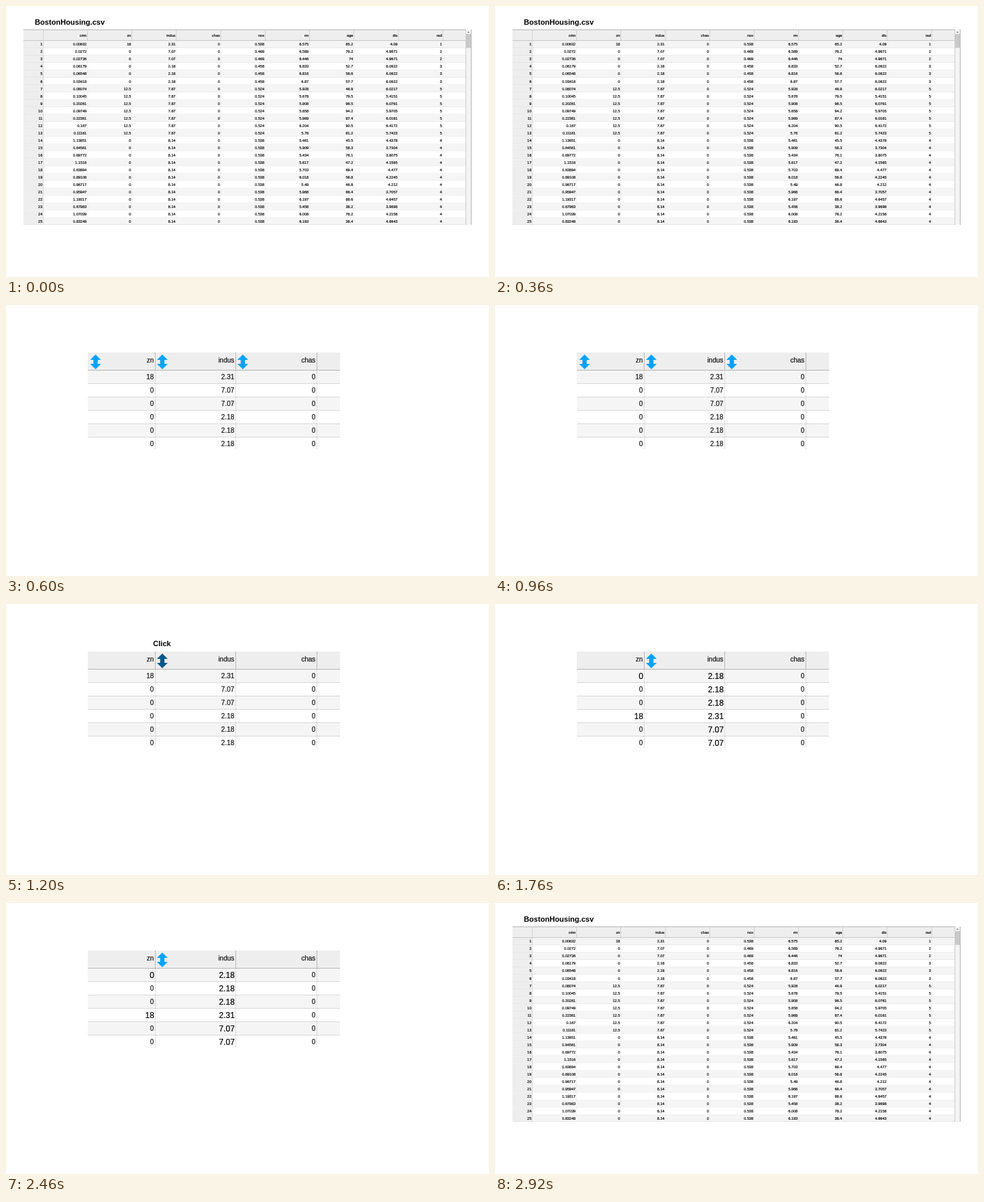
Animation, 720 px wide and 405 px high, one loop 2.96 s. Source, as an HTML page with a canvas:

```html
<!DOCTYPE html>
<html lang="en">
<head>
<meta charset="utf-8">
<title>Sorting a table</title>
<style>
  html, body { margin: 0; width: 100%; height: 100%; overflow: hidden; background: #fff; }
  canvas { display: block; width: 720px; height: 405px; }
</style>
</head>
<body>
<canvas id="stage"></canvas>
<script>
const W = 720, H = 405, LOOP = 2960;
const FONT = '"Liberation Sans", Arial, sans-serif';
const BLUE = '#00a2ff', NAVY = '#00578a';
const canvas = document.getElementById('stage');
const ctx = canvas.getContext('2d');
const ratio = window.devicePixelRatio || 1;
canvas.width = W * ratio;
canvas.height = H * ratio;
ctx.scale(ratio, ratio);

let seed = 17;
function random() {
  seed = (seed * 16807) % 2147483647;
  return seed / 2147483647;
}

// Each district shares some values; a [low, high] pair varies by row.
const districts = [
  { count: 1, zn: 18, indus: 2.31, nox: 0.538, rad: 1, crim: 0.00632, rm: 6.575, age: 65.2, dis: 4.09 },
  { count: 2, zn: 0, indus: 7.07, nox: 0.469, rad: 2, crim: [0.0272, 0.0274], rm: [6.4, 7.2], age: [61, 79], dis: 4.9671 },
  { count: 3, zn: 0, indus: 2.18, nox: 0.458, rad: 3, crim: [0.029, 0.07], rm: [6.4, 7.2], age: [45, 59], dis: 6.0622 },
  { count: 7, zn: 12.5, indus: 7.87, nox: 0.524, rad: 5, crim: [0.08, 0.23], rm: [5.6, 6.4], age: [39, 99], dis: [5.4, 6.6] },
  { count: 12, zn: 0, indus: 8.14, nox: 0.538, rad: 4, crim: [0.62, 1.26], rm: [5.4, 6.2], age: [29, 99], dis: [3.7, 4.7] }
];
const digits = { crim: 5, rm: 3, age: 1, dis: 4 };
const names = ['crim', 'zn', 'indus', 'chas', 'nox', 'rm', 'age', 'dis', 'rad'];

function cell(district, name) {
  const value = district[name] ?? 0;
  if (!Array.isArray(value)) return value;
  const [low, high] = value;
  return +(low + (high - low) * random()).toFixed(digits[name]);
}

const rows = districts.flatMap(d => Array.from({ length: d.count }, () =>
  Object.fromEntries(names.map(name => [name, cell(d, name)]))));
const firstRows = rows.slice(0, 6);
const sortedRows = [...firstRows].sort((a, b) => a.indus - b.indus);

function box(x, y, w, h, color) {
  ctx.fillStyle = color;
  ctx.fillRect(x, y, w, h);
}

function text(s, x, y, size, { align = 'right', weight = 'normal', color = '#111', grow = 0.2 } = {}) {
  ctx.font = `${weight} ${size}px ${FONT}`;
  ctx.textAlign = align;
  ctx.fillStyle = ctx.strokeStyle = color;
  ctx.lineWidth = grow;
  ctx.fillText(s, x, y);
  if (grow) ctx.strokeText(s, x, y);
}

const heading = (s, x, y, align) =>
  text(s, x, y, 11.1, { align, weight: 'bold', color: '#000', grow: 0 });

function dots(x, top, bottom, color) {
  ctx.strokeStyle = color;
  ctx.lineWidth = 1;
  ctx.setLineDash([1, 1]);
  ctx.beginPath();
  ctx.moveTo(x + 0.5, top);
  ctx.lineTo(x + 0.5, bottom);
  ctx.stroke();
  ctx.setLineDash([]);
}

function arrow(cx, color) {
  const cy = 85, half = 11, head = 8, wing = 8, stem = 3.2;
  const quarter = [[0, -half], [wing, head - half], [stem, head - half]];
  const right = [...quarter, ...quarter.map(([x, y]) => [x, -y]).reverse()];
  const left = right.map(([x, y]) => [-x, y]).reverse();
  ctx.fillStyle = color;
  ctx.beginPath();
  for (const [x, y] of [...right, ...left]) ctx.lineTo(cx + x, cy + y);
  ctx.fill();
}

function drawSheet() {
  const left = 26, top = 35, body = 52, bottom = 327, step = 11.02, edge = 685;
  const size = 5.6, width = edge - left;
  heading('BostonHousing.csv', 43, 28, 'left');

  rows.forEach((row, i) => {
    const y = body + i * step;
    const h = Math.min(step, bottom - y);
    box(left, y, width, h, i % 2 ? '#fff' : '#f5f5f5');
    box(left, y, 29, h, '#eeeeee');
    box(left, y + h - 0.5, width, 0.5, '#d9d9d9');
  });
  box(left, top, width, body - top, '#eeeeee');
  box(left, top, 668, 0.8, '#aaaaaa');
  box(left, body - 0.6, width, 0.7, '#b5b5b5');
  box(55, top, 0.6, bottom - top, '#c4c4c4');

  names.forEach((name, c) => {
    const x = 120.2 + c * 66.2;
    box(x + 1, top, 0.6, body - top, '#bdbdbd');
    box(x + 1, body, 0.5, bottom - body, '#e6e6e6');
    text(name, x, 45.5, size);
  });
  rows.forEach((row, i) => {
    const y = 59.4 + i * step;
    text(i + 1, 54.3, y, size);
    names.forEach((name, c) => text(row[name], 120.2 + c * 66.2, y, size));
  });

  // scrollbar
  box(edge, top, 9, bottom - top, '#f4f4f4');
  box(edge, top, 0.7, bottom - top, '#bcbcbc');
  box(693, top, 0.8, bottom - top, '#a6a6a6');
  box(686, 42, 7, 20.5, '#c9c9c9');
  ctx.fillStyle = '#777';
  ctx.beginPath();
  ctx.moveTo(687.9, 40);
  ctx.lineTo(689.4, 37.8);
  ctx.lineTo(690.9, 40);
  ctx.fill();
}

function drawDetail(sorted) {
  const left = 122, width = 376, top = 71, body = 97, bottom = 215, step = 20;
  const shown = sorted ? sortedRows : firstRows;
  box(left, top, width, body - top, '#eeeeee');
  shown.forEach((row, i) => {
    const y = body + i * step;
    box(left, y, width, Math.min(step, bottom - y), i % 2 ? '#fff' : '#f5f5f5');
    box(left, y, width, 1, i ? '#d8d8d8' : '#b4b4b4');
  });

  ['zn', 'indus', 'chas'].forEach((name, c) => {
    const x = [222, 342, 463][c];
    box(x, top, 1, body - top, '#b8b8b8');
    dots(x, body + 1, bottom, '#c4c4c4');
    text(name, x - 1.7, 86, 10);
    shown.forEach((row, i) => {
      const big = sorted && (name === 'indus' || (name === 'zn' && i % 3 === 0));
      const y = 110.7 + i * step;
      if (big) text(row[name], x - 1.2, y + 0.8, 12, { color: '#000' });
      else text(row[name], x - 1.7, y, 10);
    });
  });
}

function draw(t) {
  box(0, 0, W, H, '#fff');
  if (t < 600 || t >= 2920) return drawSheet();
  const clicking = t >= 1200 && t < 1760;
  drawDetail(t >= 1760);
  arrow(233, clicking ? NAVY : BLUE);
  if (t < 1200) {
    arrow(133.5, BLUE);
    arrow(353, BLUE);
  }
  if (clicking) heading('Click', 232.5, 63, 'center');
}

const start = performance.now();
function tick() {
  draw((performance.now() - start) % LOOP);
  requestAnimationFrame(tick);
}
tick();
</script>
</body>
</html>
```
